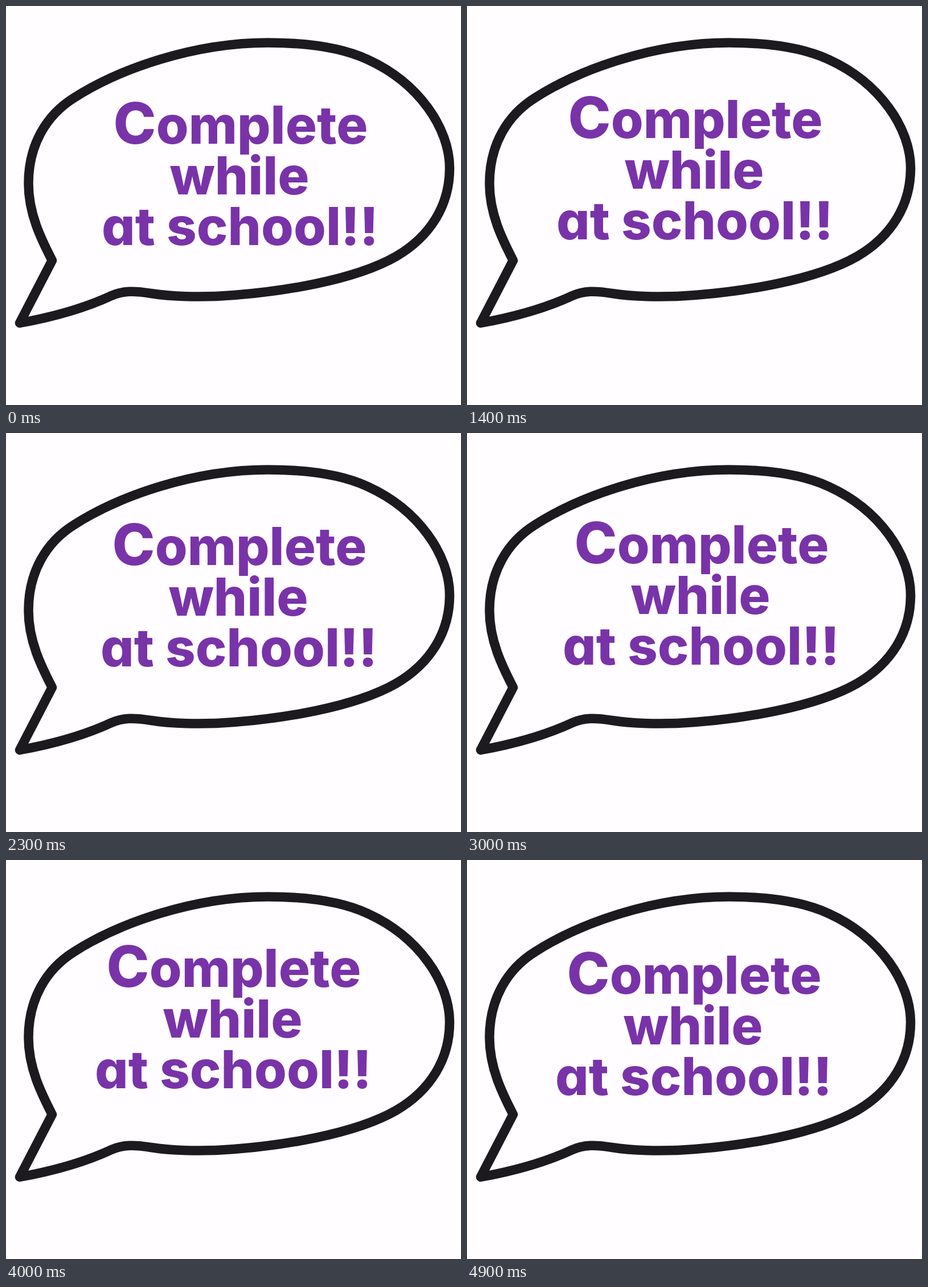
Animation of 799x701 px, one loop 5 s. Source, as an HTML page:

```html
<!DOCTYPE html>
<html lang="en">
<head>
<meta charset="utf-8">
<title>Speech bubble</title>
<style>
  html, body { margin: 0; width: 100%; height: 100%; overflow: hidden; background: #fffdff; }
  svg { display: block; width: 799px; height: 701px; }
  path { fill: none; stroke: #1c1a1e; stroke-width: 16.5; stroke-linejoin: round; }
  text {
    font: 800 92px Inter, Lato, sans-serif;
    font-feature-settings: "cv11"; /* round, single-storey a */
    fill: #7933a8;
    text-anchor: middle;
  }
  .cap { font-size: 101px; }
</style>
</head>
<body>
<svg viewBox="0 0 799 701">
  <path d="M24 557 C90 545 140 530 185 509
    C205 500 225 500 255 505 S340 513 400 508
    C480 502 610 483 685 440 C745 405 779 350 779 285
    C779 215 725 135 635 94 C590 73 530 64.5 460 64.5
    C330 64.5 200 110 120 161 C70 192 39.5 245 39.5 312
    C39.5 365 62 410 81 447Z"/>
  <g id="words">
    <text x="412" y="242"><tspan class="cap">C</tspan>omplete</text>
    <text x="410" y="331">while</text>
    <text x="411" y="420">at school!!</text>
  </g>
</svg>
<script>
  const STEP = 100, STEPS = 50;
  const words = document.getElementById("words");

  // Rest points of the shake: step, x, y
  const rests = [
    [0, 0, 0], [6, 1, -18], [14, -11, -10], [23, -2, -10],
    [30, 0, -13], [40, -12, -19], [49, -13, -7], [STEPS, 0, 0]
  ];

  const mix = (a, b, p) => a + (b - a) * p;

  // Between rests the words swing to the other side and down, then back.
  function offset(step) {
    const next = rests.findIndex(r => r[0] > step);
    const [s0, x0, y0] = rests[next - 1], [s1, x1, y1] = rests[next];
    const p = (step - s0) / (s1 - s0), swing = Math.sin(Math.PI * p);
    const x = mix(x0, x1, p), y = mix(y0, y1, p);
    return [mix(x, -12 - x, swing), mix(y, 2, swing)];
  }

  const start = performance.now();

  function draw() {
    const step = Math.floor((performance.now() - start) / STEP) % STEPS;
    words.setAttribute("transform", `translate(${offset(step < 2 ? 0 : step)})`);
    requestAnimationFrame(draw);
  }
  draw();
</script>
</body>
</html>
```
